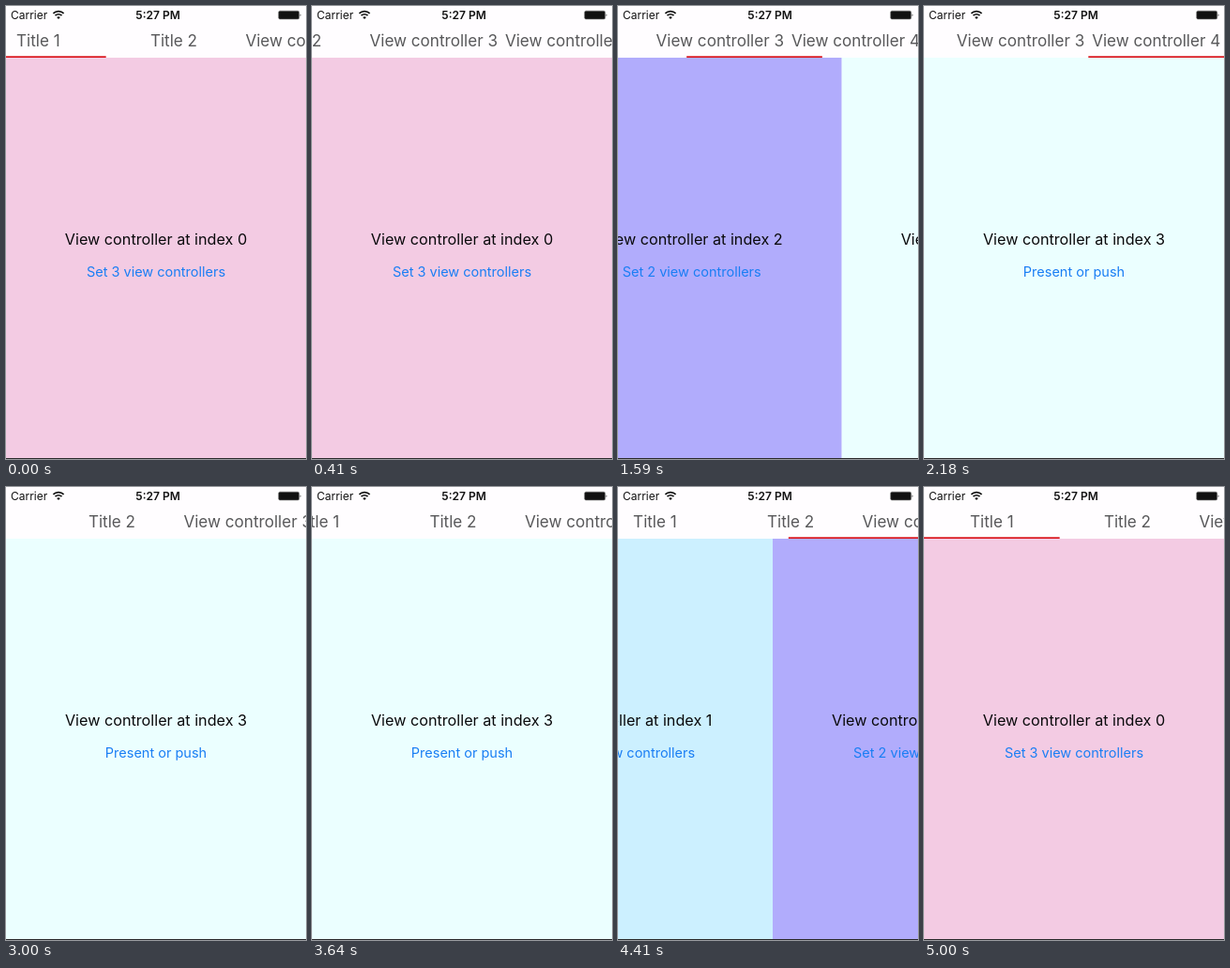
An HTML page for the animation above (5050 ms loop, 320 px wide and 482 px high).

```html
<!DOCTYPE html>
<html lang="en">
<head>
<meta charset="utf-8">
<title>Tabbed pages</title>
<style>
html, body { margin: 0; width: 100%; height: 100%; overflow: hidden; background: #fff; }
svg { display: block; font-family: Inter, Roboto, sans-serif; }
.tab, .title, .button { text-anchor: middle; }
.tab { font-size: 17.1px; fill: #58585a; }
.title { font-size: 16.2px; fill: #0a0a0c; }
.button { font-size: 14.5px; fill: #1a7ef4; }
.status { font-size: 12px; fill: #111; }
</style>
</head>
<body>
<svg width="320" height="482" viewBox="0 0 320 482">
  <g id="pages"></g>
  <rect y="481" width="320" height="1" fill="#2a2a2c"/>
  <rect width="320" height="55" fill="#fffdff"/>
  <g id="strip"><rect id="marker" y="53.3" height="1.7" fill="#d9141c"/></g>
  <g class="status">
    <text x="5" y="14">Carrier</text>
    <text x="162" y="14" text-anchor="middle" font-weight="600">5:27 PM</text>
    <g fill="none" stroke="#111" stroke-width="1.7">
      <path d="M50.4 7.9a7.9 7.9 0 0 1 11.2 0M52.5 10.2a4.9 4.9 0 0 1 7 0"/>
    </g>
    <path d="M56 14l-1.9-1.9a2.7 2.7 0 0 1 3.8 0z"/>
    <rect x="290.7" y="5.2" width="22" height="8.8" rx="1.6" stroke="#777" stroke-width=".6"/>
    <path d="M313.7 8.2q1.6 1.5 0 3.1z"/>
  </g>
</svg>
<script>
const LOOP = 5050, PAGE = 320, TAB = 144.67;
const MAX_SCROLL = 4 * TAB - PAGE;
const pages = [
  ["Title 1", "Set 3 view controllers", "#f3cbe3"],
  ["Title 2", "Set 10 view controllers", "#ccf0ff"],
  ["View controller 3", "Set 2 view controllers", "#b1acfc"],
  ["View controller 4", "Present or push", "#ebffff"],
];
const byId = id => document.getElementById(id);
const pageGroup = byId("pages"), strip = byId("strip"), marker = byId("marker");

function add(parent, tag, attrs, text = "") {
  const el = document.createElementNS("http://www.w3.org/2000/svg", tag);
  for (const key in attrs) el.setAttribute(key, attrs[key]);
  el.textContent = text;
  parent.append(el);
}

marker.setAttribute("width", TAB);
pages.forEach(([tab, button, color], i) => {
  const x = i * PAGE, mid = x + PAGE / 2;
  add(pageGroup, "rect", { x, y: 55, width: PAGE, height: 426, fill: color });
  add(pageGroup, "text", { x: mid, y: 254.3, class: "title" }, "View controller at index " + i);
  add(pageGroup, "text", { x: mid, y: 287.5, class: "button" }, button);
  add(strip, "text", { x: (i + 0.5) * TAB, y: 43, class: "tab" }, tab);
});

const inOut = u => (1 - Math.cos(Math.PI * u)) / 2;
const out = u => 1 - (1 - u) ** 3;

// Each move: start, duration, easing, strip scroll target, page target
const moves = [
  [20, 530, out, 235.5, 0],
  [1390.7, 300, inOut, MAX_SCROLL, 3],
  [2560, 1050, out, 66.5, 3],
  [4260, 300, inOut, 0, 0],
];

function draw() {
  const t = performance.now() % LOOP;
  let scroll = 38, page = 0;
  for (const [start, length, ease, toScroll, toPage] of moves) {
    if (t < start) break;
    const k = ease(Math.min(1, (t - start) / length));
    scroll += (toScroll - scroll) * k;
    page += (toPage - page) * k;
  }
  pageGroup.setAttribute("transform", `translate(${-page * PAGE} 0)`);
  strip.setAttribute("transform", `translate(${-scroll} 0)`);
  marker.setAttribute("x", page * TAB);
  requestAnimationFrame(draw);
}
draw();
</script>
</body>
</html>
```
